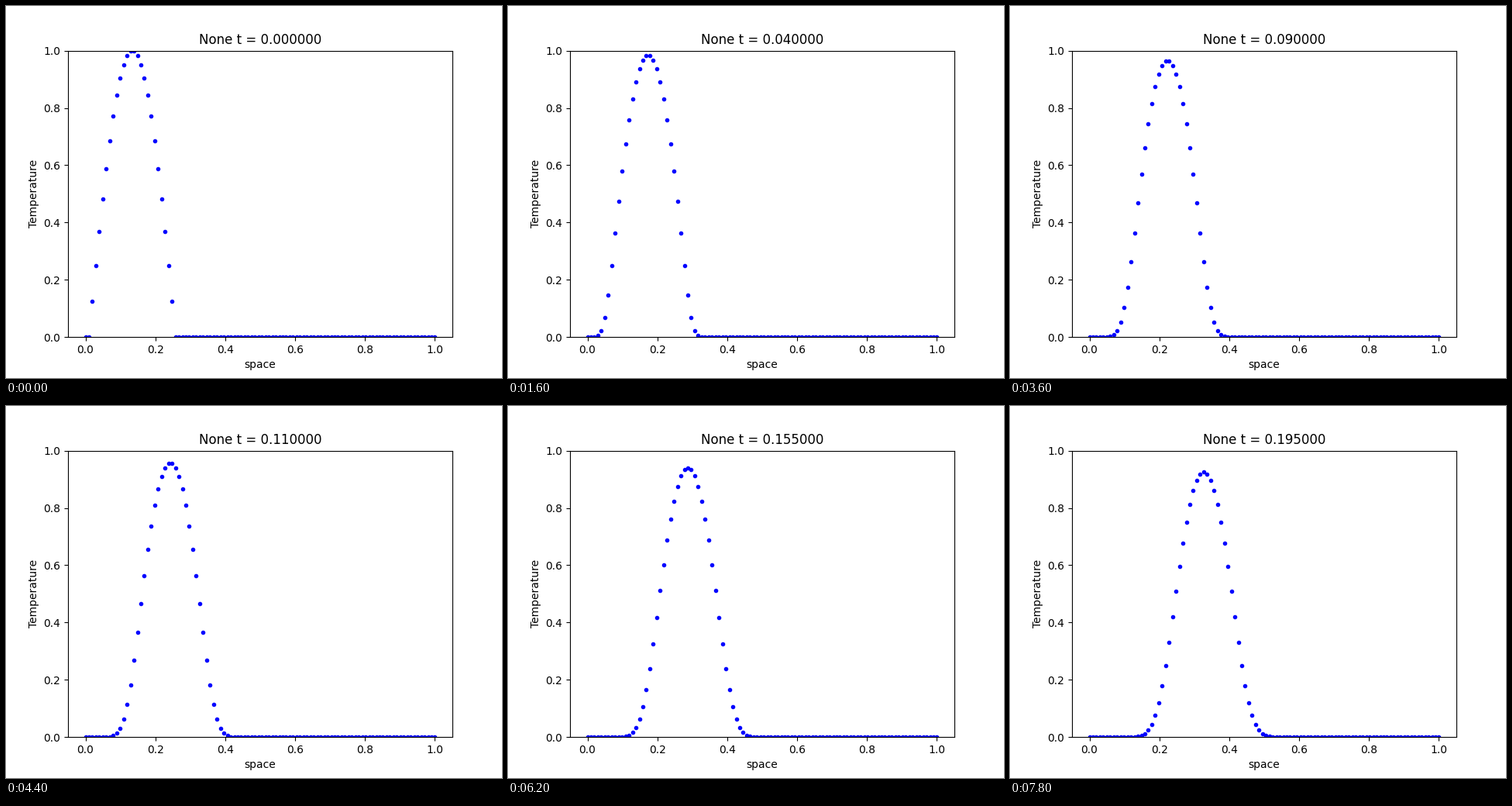
Write a matplotlib script that moves like this. It is 640 by 480 pixels and loops after 8 s.

```python
import numpy as np
import matplotlib.pyplot as plt
from matplotlib.animation import FuncAnimation

N_POINTS = 102
N_STEPS = 40
DT = 0.005
COURANT = 0.5

x = np.linspace(0, 1, N_POINTS)


def solve():
    """Advect a half-sine pulse with a first-order upwind scheme."""
    u = np.zeros((N_STEPS, N_POINTS))
    u[0, 1:27] = np.sin(np.pi * np.linspace(0, 1, 26))
    for n in range(N_STEPS - 1):
        u[n + 1, 1:] = u[n, 1:] - COURANT * (u[n, 1:] - u[n, :-1])
    return u


history = solve()

plt.rcParams["font.family"] = "DejaVu Sans"
fig, ax = plt.subplots(figsize=(6.4, 4.8), dpi=100)
fig.subplots_adjust(left=0.125, right=0.9, bottom=0.11, top=0.88)
dots, = ax.plot(x, history[0], "b.")
ax.set_xlim(-0.05, 1.05)
ax.set_ylim(0, 1)
ax.set_xlabel("space")
ax.set_ylabel("Temperature")
title = ax.set_title("")


def update(step):
    dots.set_ydata(history[step])
    title.set_text(f"None t = {step * DT:.6f}")
    return dots, title


anim = FuncAnimation(fig, update, frames=N_STEPS, interval=200,
                     repeat=True, repeat_delay=0, blit=False)
plt.show()
```
